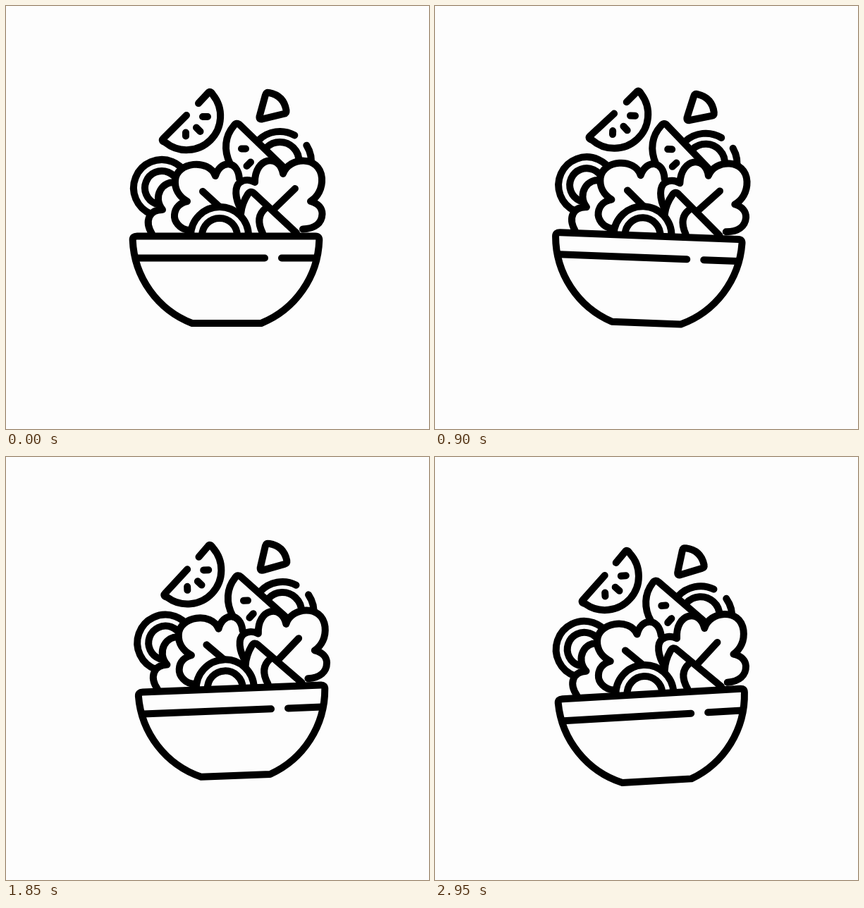
These frames come from a looping animation (600 by 600 pixels, 3 s). An HTML page with a canvas:

```html
<!DOCTYPE html>
<html lang="en">
<head>
<meta charset="utf-8">
<title>Salad bowl</title>
<style>
html, body { margin: 0; width: 100%; height: 100%; overflow: hidden; background: #fdfdfd; }
canvas { display: block; width: 100vmin; height: 100vmin; }
</style>
</head>
<body>
<canvas id="stage" width="600" height="600"></canvas>
<script>
const ctx = document.getElementById('stage').getContext('2d');
const PAPER = '#fdfdfd', INK = '#000';
const LOOP = 3000, STEP = 50;

// The whole bowl shakes between a few poses, easing in and out of each
const poses = [
  { at: 0, x: 0, y: 0, tilt: 0 },
  { at: 350, x: 0.5, y: -3.2, tilt: -1 },
  { at: 550, x: -2, y: -8.5, tilt: 0.5 },
  { at: 900, x: -7.5, y: -0.8, tilt: 2.2 },
  { at: 1250, x: 2.3, y: -11.8, tilt: -0.6 },
  { at: 1600, x: -6, y: 8.6, tilt: -7.3 },
  { at: 1950, x: 10, y: 1, tilt: -1 },
  { at: 2200, x: 3, y: -5.6, tilt: -4.3 },
  { at: 2600, x: -9.8, y: -10.2, tilt: 7.5 },
  { at: 2950, x: -7, y: 10.2, tilt: -3.3 }
];

const ease = u => u * u * (3 - 2 * u);

function poseAt(t) {
  const next = poses.findIndex(p => p.at > t);
  if (next < 0) return poses[poses.length - 1];
  const a = poses[next - 1], b = poses[next];
  const u = ease((t - a.at) / (b.at - a.at));
  const mix = key => a[key] + (b[key] - a[key]) * u;
  return { x: mix('x'), y: mix('y'), tilt: mix('tilt') };
}

const rad = deg => deg * Math.PI / 180;
const solid = d => ({ path: new Path2D(d), fill: true });
const line = d => ({ path: new Path2D(d), fill: false });

function arc(x, y, r, from, to, fill = false) {
  const path = new Path2D();
  path.arc(x, y, r, rad(from), rad(to));
  return { path, fill };
}

// Back to front
const shapes = [
  // loose slice
  line('M256 155 L223 188 Q219.5 191.5 226 193.5 A48 48 0 0 0 293.5 126 Q290 119 286.5 123.5 L273 138'),
  line('M255 179.5 V184.5 M270 172.5 L275.5 178 M279 157 H286'),
  // loose wedge
  line('M373 123 Q394 127 397.5 148 Q398 152 394 153 L363 160.5 Q358 161 360 155 L368 126 Q369 122 373 123 Z'),
  // right onion
  arc(388.5, 221, 43, 225, 299),
  arc(389, 221, 44, 328, 370),
  arc(388.5, 220, 27, 225, 365),
  // upper slice
  solid('M318 224 C308 204 311 184 323 170 Q327 164 332 169 L392 227'),
  line('M334 202.5 H340 M341.5 227 L347 221.5'),
  // left onion
  arc(221, 258, 40, 112, 310, true),
  arc(221, 258, 24, 112, 315),
  // small leaf
  solid('M242 251 C222 246 207 271 222 289 C203 289 196 305 207 323'),
  // left leaf
  solid('M260 318 C246 317 238 305 239 296 C240 285 248 279 257 277 C245 270 239 259 240 247 C242 221 288 216 297 241 C304 218 329 218 331 245'),
  line('M279 263 L303 285'),
  // right leaf
  solid('M334 290 C324 272 324 256 332 250 C338 246 346 246 353 250 C353 214 388 209 393 238 C401 214 445 211 448 244 C449 259 442 271 432 277 C443 280 448.5 287 448.5 295 C448 308 438 316 421 316.5'),
  line('M410 259 L378 290'),
  // lower slice
  solid('M338 323 C330 304 332 284 343 267 Q347 261 352 266 L412 322'),
  line('M368 287 C357 296 357 308 364 322'),
  // front onion
  arc(303, 326, 41, 180, 360, true),
  arc(303, 326, 25, 180, 360),
  // bowl
  solid('M186 326.5 H439 Q444.5 326.5 444.3 332 A132 132 0 0 1 362 450 H264 A132 132 0 0 1 179.7 332 Q179.5 326.5 186 326.5 Z'),
  line('M186 357.5 H367 M391 357.5 H439')
];

function draw(t) {
  const { x, y, tilt } = poseAt(t);
  ctx.setTransform(1, 0, 0, 1, 0, 0);
  ctx.fillStyle = PAPER;
  ctx.fillRect(0, 0, 600, 600);
  ctx.translate(300 + x, 300 + y);
  ctx.rotate(rad(tilt));
  ctx.translate(-300, -300);
  ctx.strokeStyle = INK;
  ctx.lineWidth = 10;
  ctx.lineCap = ctx.lineJoin = 'round';
  for (const { path, fill } of shapes) {
    if (fill) ctx.fill(path);
    ctx.stroke(path);
  }
}

const start = performance.now();
function tick() {
  const t = (performance.now() - start) % LOOP;
  draw(Math.floor(t / STEP) * STEP);
  requestAnimationFrame(tick);
}
tick();
</script>
</body>
</html>
```
